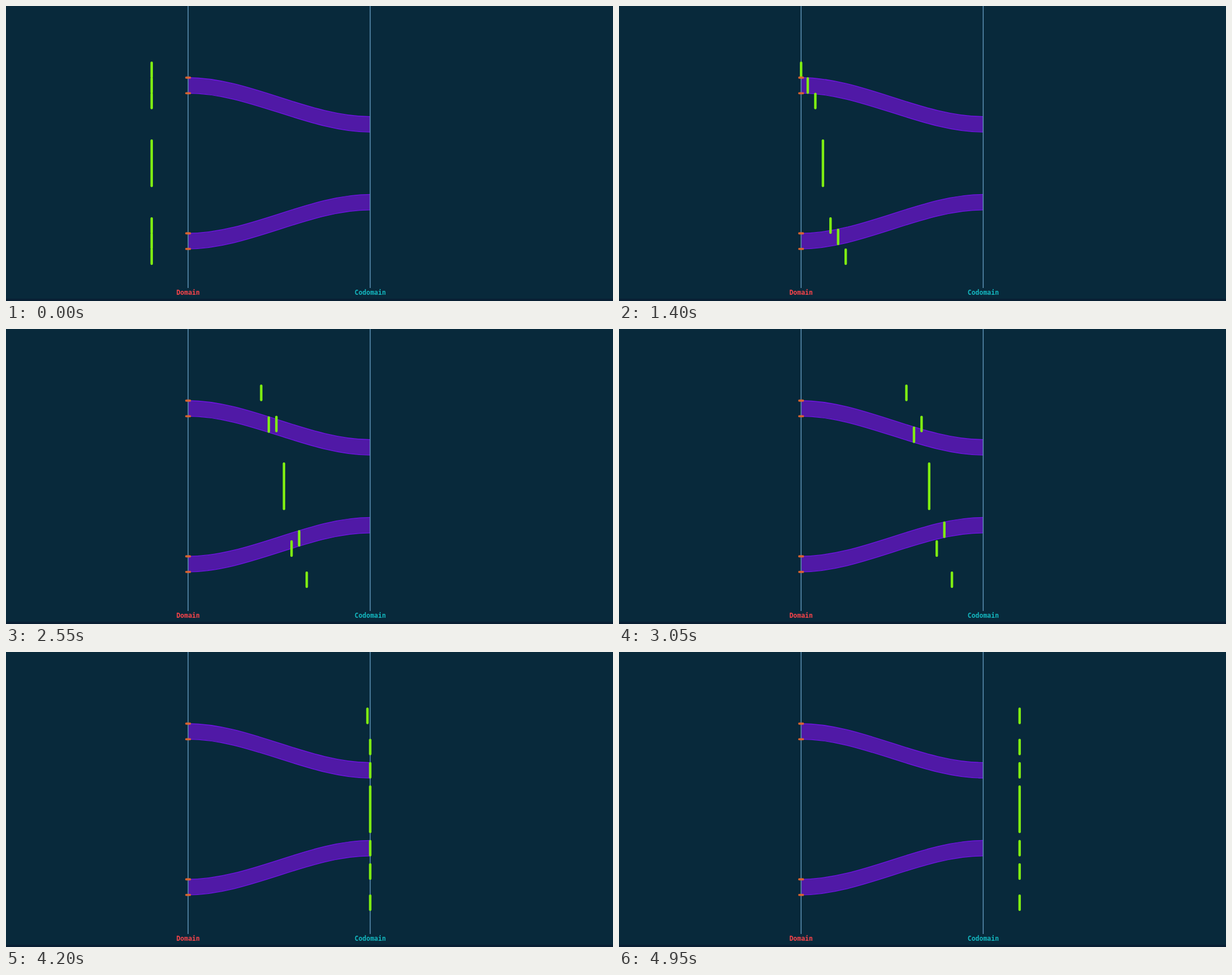
An HTML page for the animation above (5000 ms loop, 1074 by 522 pixels).

```html
<!DOCTYPE html>
<html lang="en">
<head>
<meta charset="utf-8">
<title>Domain and codomain</title>
<style>
  html, body { margin: 0; width: 100%; height: 100%; overflow: hidden; background: #08293b; }
  svg { display: block; width: 1074px; height: 522px; }
  .ribbon { fill: #5019a6; stroke: none; }
  .edge { fill: none; stroke: #6f14e2; stroke-width: 1.3; }
  .axis { stroke: #5f95b8; stroke-width: 1.5; }
  .bar { stroke: #7fee12; stroke-width: 4.4; stroke-linecap: round; }
  .tick { stroke: #e2652f; stroke-width: 3.8; stroke-linecap: round; opacity: .93; }
  text { font: bold 11.5px "DejaVu Sans Mono", monospace; text-anchor: middle; }
</style>
</head>
<body>
<svg id="stage" viewBox="0 0 1074 522"></svg>
<script>
const W = 1074, H = 522, PLOT = H * 0.95;
const LEFT = W * 0.3, RIGHT = W * 0.6, SPAN = RIGHT - LEFT, MARGIN = W * 0.06;
const UNIT = PLOT / 18;
const FRAME = 50, LOOP = 5000, LAST = LOOP - FRAME;
const stage = document.getElementById('stage');

const levelY = k => PLOT * 0.2 + k * UNIT;
const clamp = v => Math.min(1, Math.max(0, v));
const smooth = p => p * p * (3 - 2 * p);

function add(tag, attrs, text) {
  const el = document.createElementNS('http://www.w3.org/2000/svg', tag);
  for (const name in attrs) el.setAttribute(name, attrs[name]);
  if (text) el.textContent = text;
  return stage.appendChild(el);
}

function line(cls, x1, y1, x2, y2) {
  return add('line', { class: cls, x1, y1, x2, y2 });
}

// Cubic with controls at thirds: x is linear and y follows smooth().
function curve(x0, y0, x1, y1) {
  const dx = (x1 - x0) / 3;
  return `${x0} ${y0}C${x0 + dx} ${y0} ${x1 - dx} ${y1} ${x1} ${y1}`;
}

function ribbon(from, to) {
  const a = levelY(from), b = levelY(to);
  const top = curve(LEFT, a, RIGHT, b);
  const back = curve(RIGHT, b + UNIT, LEFT, a + UNIT);
  add('path', { class: 'ribbon', d: `M${top}L${back}Z` });
  add('path', { class: 'edge', d: `M${top}M${back}` });
}

add('rect', { y: 518, width: W, height: 4, fill: '#081f33' });
ribbon(1, 3.5);
ribbon(11, 8.5);
for (const x of [LEFT, RIGHT]) line('axis', x, 0, x, 499);

// start level, length and vertical shift, all in units
const bars = [
  [0, 1, 0], [1, 1, 2.5], [2, 1, 0],
  [5, 3, 0],
  [10, 1, 0], [11, 1, -2.5], [12, 1, 0]
].map(([k, len, shift]) => ({ k, len, shift, el: line('bar', 0, 0, 0, 0) }));

for (const k of [1, 2, 11, 12])
  line('tick', LEFT - 3.3, levelY(k), LEFT + 3.3, levelY(k));

add('text', { x: LEFT, y: 510.6, fill: '#fb444a' }, 'Domain');
add('text', { x: RIGHT, y: 510.6, fill: '#14b8c0' }, 'Codomain');

function draw(ms) {
  const t = Math.floor((ms % LOOP) / FRAME) * FRAME;
  const phase = t / LAST * 7;
  const enter = clamp(phase), leave = clamp(phase - 6);
  bars.forEach(({ k, len, shift, el }, i) => {
    // Crossing takes four phases; the lowest bar sets off first.
    const p = clamp((phase - 1) / 4 - (6 - i) / 24);
    const x = LEFT + (enter - 1 + leave) * MARGIN + p * SPAN;
    const y = levelY(k + shift * smooth(p));
    const inset = 1.3;
    el.setAttribute('x1', x);
    el.setAttribute('x2', x);
    el.setAttribute('y1', y + inset);
    el.setAttribute('y2', y + len * UNIT - inset);
  });
}

const start = performance.now();
function tick(now) {
  draw(Math.max(0, now - start));
  requestAnimationFrame(tick);
}
draw(0);
requestAnimationFrame(tick);
</script>
</body>
</html>
```
